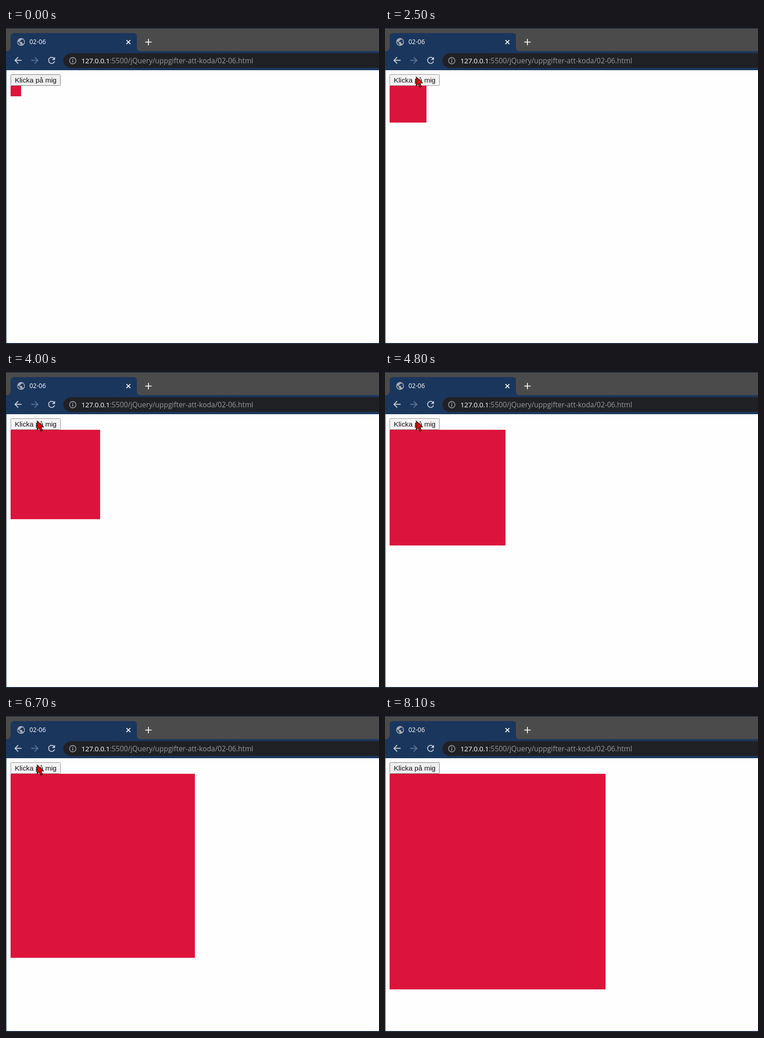
Write an HTML page that moves like this. It is 812 by 689 pixels and loops after 8200 ms.

```html
<!DOCTYPE html>
<html lang="sv">
<head>
<meta charset="utf-8">
<title>02-06</title>
<style>
  html, body { margin: 0; width: 100%; height: 100%; overflow: hidden; }
  svg { display: block; width: 812px; height: 689px; }
  .ui { font-family: "Open Sans", "Noto Sans", sans-serif; }
  .icon { fill: none; stroke: #fff; stroke-width: 1.8; }
</style>
</head>
<body>
<svg viewBox="0 0 812 689">
  <rect width="812" height="689" fill="#fefefe"/>

  <!-- Tab strip -->
  <rect width="812" height="51" fill="#4b4b4b"/>
  <rect width="812" height="1" fill="#0b2136"/>
  <path d="M0 51Q10 51 10 42V19Q10 11 18 11H277Q285 11 285 19V42Q285 51 295 51Z" fill="#1b365d"/>
  <path transform="translate(22.7 20.4) scale(.84)" fill="#a9aeb4" d="M12 2a10 10 0 1 0 0 20 10 10 0 0 0 0-20zm-1 17.93A8 8 0 0 1 4.21 10.21L9 15v1a2 2 0 0 0 2 2zm6.9-2.54A2 2 0 0 0 16 16h-1v-3a1 1 0 0 0-1-1H8v-2h2a1 1 0 0 0 1-1V7h2a2 2 0 0 0 2-2v-.41a8 8 0 0 1 2.9 12.8z"/>
  <text class="ui" x="51" y="35" font-size="13.7" fill="#fff">02-06</text>
  <path class="icon" d="M262.2 26.4l8.6 8.6m0-8.6l-8.6 8.6"/>
  <path class="icon" d="M303 30.7h14m-7-7v14" stroke-width="2"/>

  <!-- Toolbar -->
  <rect y="50.5" width="812" height="41.5" fill="#1b365d"/>
  <path class="icon" d="M34 70.5H19.5m7-7l-7 7 7 7" style="stroke:#cbd3df"/>
  <path class="icon" d="M55 70.5h14.5m-7-7l7 7-7 7" style="stroke:#5f7392"/>
  <path class="icon" d="M104.3 66A6.7 6.7 0 1 0 105.8 72.6" style="stroke:#cbd3df"/>
  <path d="M106.6 63v6.6H100z" fill="#cbd3df"/>
  <path d="M812 55H141a16 16 0 0 0 0 32H812z" fill="#202124"/>
  <circle cx="145.3" cy="71.3" r="7" fill="none" stroke="#a9adb2" stroke-width="1.5"/>
  <path d="M145.3 67v2m0 1.2v5" stroke="#a9adb2" stroke-width="1.7"/>
  <text class="ui" x="164" y="77" font-size="15.3" letter-spacing="-.3" fill="#fff">127.0.0.1</text>
  <text class="ui" x="226" y="77" font-size="15.4" fill="#969a9e">:5500/jQuery/uppgifter-att-koda/02-06.html</text>

  <!-- Page -->
  <rect y="92" width="1" height="597" fill="#1c304a"/>
  <rect y="687" width="812" height="2" fill="#0c1b2d"/>
  <rect id="button" x="10.5" y="101.5" width="108" height="24" rx="2"/>
  <text x="19.2" y="119" font-family="'Liberation Sans', Arial, sans-serif" font-size="15.29" fill="#111">Klicka på mig</text>
  <rect id="square" x="10" y="126" fill="#dc143c"/>
  <path id="cursor" d="M0 0V18.5L4.2 14.8 8 22 11.3 20.3 7.8 13.2 13.5 12.6Z" fill="#f00" stroke="#1a0505" stroke-width="1.4"/>
</svg>
<script>
const LOOP = 8200, STEP = 100, ZOOM = 1.1465;
const [button, square, cursor] = ["button", "square", "cursor"].map(id => document.getElementById(id));
const looks = { idle: ["#efefef", "#767676"], hover: ["#e5e5e5", "#4f4f4f"], down: ["#f5f5f5", "#8d8d8d"] };

// Where the clicking pace changes: [ms, clicks so far]
const pace = [[800, 0], [1500, 2], [2000, 3], [2900, 7.5], [4000, 15.5], [5800, 27.4], [7500, 39]];

const progress = (time, start, end) => Math.min(1, Math.max(0, (time - start) / (end - start)));

const clicksAt = time => pace.slice(1).reduce((sum, [end, clicks], i) =>
  sum + (clicks - pace[i][1]) * progress(time, pace[i][0], end), 0);

// The pointer glides in from the right, rests on the button and leaves to the right
function pointerAt(time) {
  if (time < 100 || time > 7700) return [900, 0];
  const enter = progress(time, 100, 700), leave = progress(time, 7500, 7700);
  return [
    68 + 732 * (1 - enter) ** 3.4 + 720 * leave ** .7,
    107 - 60 * (1 - enter) ** 12 + 4 * Math.sin(Math.PI * enter) + 51 * leave ** .5
  ];
}

function draw(now) {
  const time = Math.floor(now % LOOP / STEP) * STEP;
  const clicks = clicksAt(time) + 1e-6;
  const [x, y] = pointerAt(time);
  const size = (20 + 10 * Math.floor(clicks)) * ZOOM;
  const isDown = clicks % 1 >= .5;
  const [fill, stroke] = looks[x > 119 ? "idle" : isDown ? "down" : "hover"];
  square.setAttribute("width", size);
  square.setAttribute("height", size);
  button.setAttribute("fill", fill);
  button.setAttribute("stroke", stroke);
  cursor.setAttribute("transform", `translate(${x} ${y})`);
  requestAnimationFrame(() => draw(performance.now()));
}
draw(0);
</script>
</body>
</html>
```
